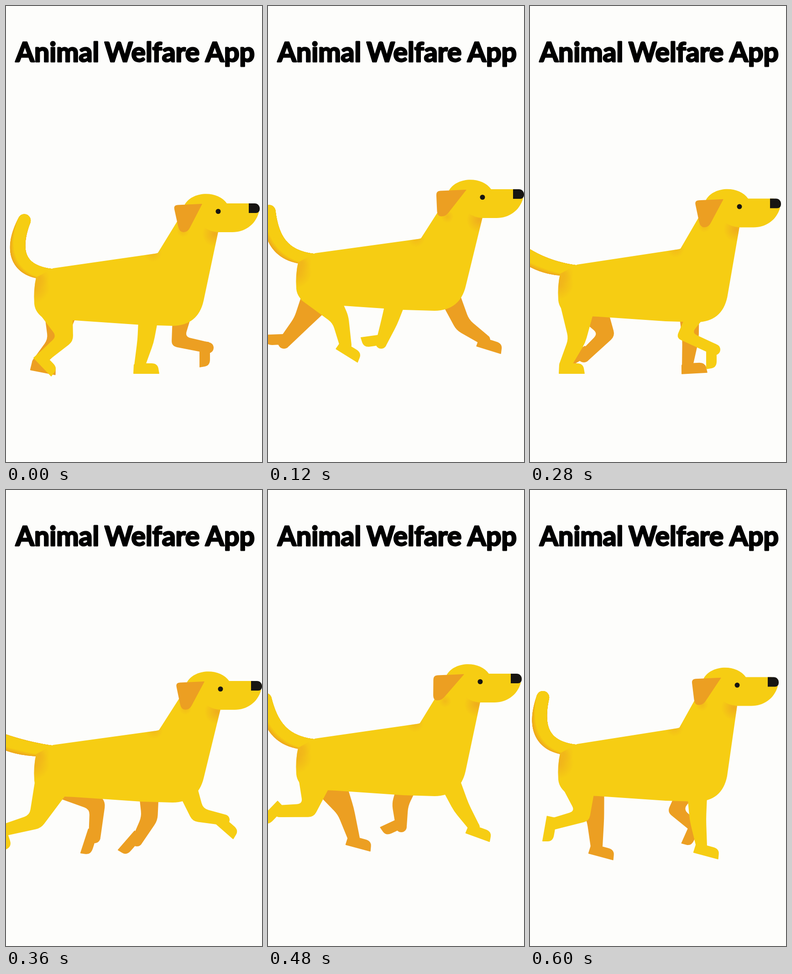
An HTML page with a canvas for the animation above (0.64 s loop, 561 px wide and 998 px high).

```html
<!DOCTYPE html>
<html lang="en">
<head>
<meta charset="utf-8">
<title>Animal Welfare App</title>
<style>
  html, body { margin: 0; width: 100%; height: 100%; overflow: hidden; background: #fdfdfb; }
  canvas, svg { position: absolute; left: 0; top: 0; display: block; }
  text {
    font: 700 59px Lato, "Open Sans", sans-serif;
    fill: #000; stroke: #000; stroke-width: 3px; stroke-linejoin: round;
  }
</style>
</head>
<body>
<canvas id="stage" width="561" height="998"></canvas>
<svg width="561" height="998" viewBox="0 0 561 998">
  <text y="122"><tspan x="21">Animal</tspan><tspan x="216">Welfare</tspan><tspan x="437">App</tspan></text>
</svg>
<script>
const ctx = document.getElementById('stage').getContext('2d');
const YELLOW = '#f6cd13', ORANGE = '#ec9f22', BLACK = '#171512';

const STEP = 40, LOOP = 640, STRIDE = 600, HOLD = 560;
const KEYS = [0, 120, 200, 280, 360, 480, 560];

// body rise, head shift, ear sway, tail angle
const BODY = [
  [0, 0, 0, 63], [-33, 5, -14, 47], [-25, -6, -11, 33], [-8, -6, -1, 22],
  [-16, 5, -1, 15], [-30, 0, -18, 43], [-18, -11, -8, 58]
];

// path of each ankle: x, y, foot angle, forward bend of the knee
const HIND = { width: [42, 19, 13], hip: () => 105, path: [
  [83, 767, 46, 38], [170, 742, 32, 16], [160, 762, 44, -3], [77, 786, 0, 15],
  [-3, 744, 72, 35], [25, 703, 134, 44], [53, 730, 100, 46]
] };
const FAR_HIND = { ...HIND, hip: () => 122, path: [
  [70, 781, 11, 20], [35, 737, 178, 5], [60, 752, 196, 25], [118, 767, 150, 48],
  [194, 760, 108, 40], [188, 762, 15, 9], [146, 781, 15, 7]
] };
const FRONT = { width: [24, 18, 12], hip: x => Math.min(390, 350 + 0.6 * (x - 350)), path: [
  [293, 786, 0, 4], [248, 738, 172, 2], [266, 749, 160, -5], [405, 752, 90, -60],
  [478, 722, 41, -33], [452, 738, 20, -5], [376, 779, 15, -4]
] };
const FAR_FRONT = { ...FRONT, path: [
  [443, 748, 90, -51], [475, 731, 17, -19], [447, 753, 17, -19], [345, 786, -3, 6],
  [287, 768, 131, 18], [292, 737, 155, -12], [366, 742, 114, -45]
] };

// smooth cyclic interpolation through the key poses
function sample(poses, t) {
  const n = KEYS.length;
  let i = n - 1;
  while (KEYS[i] > t) i--;
  const time = k => KEYS[(k + n) % n] + STRIDE * Math.floor(k / n);
  const pose = k => poses[(k + n) % n];
  const span = time(i + 1) - time(i), u = (t - time(i)) / span;
  const slope = (k, c) => (pose(k + 1)[c] - pose(k - 1)[c]) / (time(k + 1) - time(k - 1)) * span;
  return pose(i).map((a, c) => {
    const d = pose(i + 1)[c] - a;
    const m0 = slope(i, c), m1 = slope(i + 1, c);
    return a + u * (m0 + u * (3 * d - 2 * m0 - m1 + u * (m0 + m1 - 2 * d)));
  });
}

const mix = (a, b, k) => [a[0] + (b[0] - a[0]) * k, a[1] + (b[1] - a[1]) * k];

// point at a distance along and across the direction given by an angle
function offset([x, y], angle, along, across) {
  const c = Math.cos(angle), s = Math.sin(angle);
  return [x + along * c - across * s, y + along * s + across * c];
}

const heading = (a, b) => Math.atan2(b[1] - a[1], b[0] - a[0]);

// closed polygon whose corners are rounded by the given cut lengths
function blob(points, round, color) {
  const n = points.length;
  const toward = (p, q, r) => mix(p, q, Math.min(r / Math.hypot(q[0] - p[0], q[1] - p[1]), 0.5));
  ctx.beginPath();
  points.forEach((p, i) => {
    ctx.lineTo(...toward(p, points[(i + n - 1) % n], round[i]));
    ctx.quadraticCurveTo(...p, ...toward(p, points[(i + 1) % n], round[i]));
  });
  ctx.closePath();
  ctx.fillStyle = color;
  ctx.fill();
}

function dot(x, y, r, color) {
  ctx.fillStyle = color;
  ctx.beginPath();
  ctx.arc(x, y, r, 0, 2 * Math.PI);
  ctx.fill();
}

function leg({ path, hip, width }, t, dy, color) {
  const [x, y, turn, bend] = sample(path, t);
  const ankle = [x, y], top = [hip(x), 650 + dy];
  const knee = offset(mix(top, ankle, 0.61), heading(top, ankle), 0, -bend);
  const thigh = heading(top, knee), shin = heading(knee, ankle);
  const joints = [[top, thigh], [knee, (thigh + shin) / 2], [ankle, shin]];
  const side = sign => joints.map(([p, a], i) => offset(p, a, 0, sign * width[i]));
  blob([...side(1), ...side(-1).reverse()], [0, 12, 2, 2, 12, 0], color);

  const foot = (u, v) => offset(ankle, turn * Math.PI / 180, u, v);
  dot(x, y, width[2], color);
  blob([foot(-13, -2), foot(-14, 19), foot(43, 19), foot(39, -4), foot(12, -4)], [2, 1, 1, 18, 4], color);
}

function tail(angle, dy) {
  const base = [100, 587 + dy];
  const arm = (length, degrees) => offset(base, (180 + degrees) * Math.PI / 180, length, 0);
  const p0 = arm(134 + 14 * Math.sin(3 * angle * Math.PI / 180), angle);
  const p1 = arm(105, 0.57 * angle);
  const p2 = arm(50 + 0.55 * angle, 3);
  const at = s => {
    const a = mix(p0, p1, s), b = mix(p1, p2, s), c = mix(p2, base, s);
    return mix(mix(a, b, s), mix(b, c, s), s);
  };
  ['#efab1d', '#f1b61a', '#f4c216', YELLOW].forEach((color, k) => {
    for (let s = 0; s <= 1; s += 0.01) {
      const [x, y] = at(s), swell = Math.sin(Math.PI * s), shift = 1.6 * k * swell;
      dot(x + shift * 0.8, y - shift * 0.6, 14 + 4 * swell - 2 * s - shift, color);
    }
  });
}

function glow(x, y, r, alpha) {
  const g = ctx.createRadialGradient(x, y, 0, x, y, r);
  g.addColorStop(0, `rgba(236,159,34,${alpha})`);
  g.addColorStop(1, 'rgba(236,159,34,0)');
  ctx.fillStyle = g;
  ctx.fillRect(x - r, y - r, 2 * r, 2 * r);
}

function torso(dy, hx) {
  // w blends a point from the body's motion to the head's
  const p = (x, y, w = 0) => [x + w * hx, y + dy + w * 0.4 * hx];
  ctx.beginPath();
  ctx.moveTo(...p(395, 436, 1));
  ctx.lineTo(...p(376, 470, 0.8));
  ctx.lineTo(...p(333, 540, 0.5));
  ctx.quadraticCurveTo(...p(332, 541, 0.5), ...p(326, 542, 0.5));
  ctx.lineTo(...p(103, 574));
  ctx.lineTo(...p(66, 594));
  ctx.quadraticCurveTo(...p(60, 620), ...p(62, 652));
  ctx.quadraticCurveTo(...p(64, 672), ...p(85, 685));
  ctx.lineTo(...p(150, 688));
  ctx.lineTo(...p(297, 698));
  ctx.lineTo(...p(365, 700));
  ctx.quadraticCurveTo(...p(421, 699), ...p(433, 645, 0.1));
  ctx.lineTo(...p(465, 494, 1));
  ctx.lineTo(...p(465, 450, 1));
  ctx.closePath();
  ctx.fillStyle = YELLOW;
  ctx.fill();
  ctx.save();
  ctx.clip();
  glow(...p(60, 615), 36, 0.65);
  glow(...p(74, 594), 22, 0.35);
  glow(...p(322, 540, 0.5), 20, 0.45);
  glow(...p(458, 499, 1), 28, 0.7);
  glow(...p(388, 492, 1), 14, 0.4);
  ctx.restore();
}

function head(dy, hx, sway) {
  ctx.save();
  ctx.translate(hx, dy + 0.4 * hx);
  ctx.fillStyle = YELLOW;
  ctx.beginPath();
  ctx.moveTo(392, 434);
  ctx.bezierCurveTo(410, 404, 465, 404, 484, 432);
  ctx.lineTo(540, 432);
  ctx.lineTo(554, 452);
  ctx.bezierCurveTo(546, 480, 522, 495, 496, 495);
  ctx.lineTo(466, 495);
  ctx.quadraticCurveTo(446, 494, 434, 484);
  ctx.lineTo(385, 470);
  ctx.closePath();
  ctx.fill();

  const low = 495 + sway / 4;
  blob([[430, 433], [367 + sway / 4, 436], [380 + sway, low], [398 + sway, low]], [1, 9, 12, 10], ORANGE);
  dot(465, 449.5, 5.5, BLACK);

  ctx.fillStyle = BLACK;
  ctx.beginPath();
  ctx.roundRect(532, 432, 24, 21, [0, 11, 8, 0]);
  ctx.fill();
  ctx.restore();
}

function draw(t) {
  const [dy, hx, sway, angle] = sample(BODY, t);
  ctx.fillStyle = '#fdfdfb';
  ctx.fillRect(0, 0, 561, 998);
  leg(FAR_HIND, t, dy, ORANGE);
  leg(FAR_FRONT, t, dy, ORANGE);
  tail(angle, dy);
  leg(HIND, t, dy, YELLOW);
  leg(FRONT, t, dy, YELLOW);
  torso(dy, hx);
  head(dy, hx, sway);
}

const start = performance.now();
function tick() {
  const t = (performance.now() - start) % LOOP;
  draw(Math.min(Math.floor(t / STEP) * STEP, HOLD));
  requestAnimationFrame(tick);
}
tick();
</script>
</body>
</html>
```
